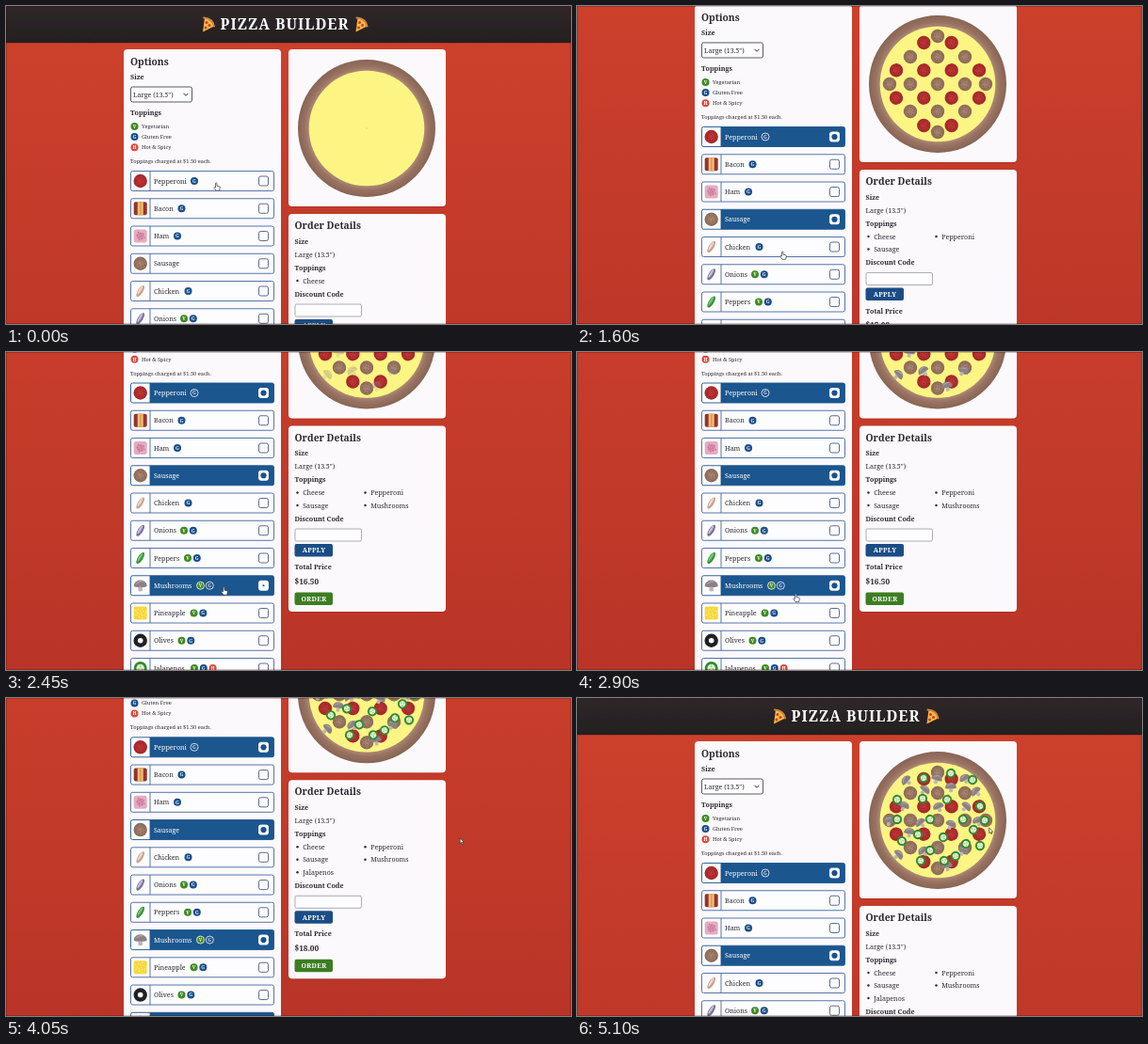
Animation of 600x338 px, one loop 5.15 s. Source, as an HTML page:

```html
<!DOCTYPE html>
<html lang="en">
<head>
<meta charset="utf-8">
<title>Pizza Builder</title>
<style>
  html, body { margin: 0; width: 100%; height: 100%; overflow: hidden; background: #c63b29; }
  svg { display: block; width: 100vw; height: 100vh; }
  text { font: 7.1px 'Noto Serif', serif; fill: #2c2930; }
  .bold { font-weight: 700; font-size: 7.2px; }
  .title { font-weight: 700; font-size: 10.3px; }
  .small { font-size: 5.7px; }
  .price { font-weight: 700; font-size: 8.3px; }
  .button { font-weight: 700; font-size: 7px; letter-spacing: .3px; fill: #fff; text-anchor: middle; }
  .logo { font-weight: 700; font-size: 15.5px; letter-spacing: 1px; fill: #fff; text-anchor: middle; }
  .letter { font-weight: 700; font-size: 5px; fill: #fff; text-anchor: middle; }
  .panel { fill: #fbf9fc; }
  .fill { fill: none; }
  .frame { fill: none; stroke: #45679c; stroke-width: .9; }
  .box { fill: #fdfcfe; stroke: #4a5c86; stroke-width: .9; }
  .dot { fill: #1a5189; }
  .on .fill { fill: #1b568e; }
  .on .frame { stroke: #1b568e; }
  .on .label { fill: #fff; }
  .on .box { stroke: #fff; }
  .on .badge { stroke: #fff; stroke-width: .8; }
</style>
</head>
<body>
<svg id="stage" viewBox="0 0 600 338" preserveAspectRatio="none"></svg>
<script>
const LOOP = 5150, STEP = 50;
const PIZZA = { x: 383, y: 130 };
const ROW_PITCH = 29.25, LIST_PITCH = 13.5;

const text = (x, y, str, cls = '', extra = '') => `<text x="${x}" y="${y}" class="${cls}" ${extra}>${str}</text>`;
const rect = (x, y, w, h, r, attrs) => `<rect x="${x}" y="${y}" width="${w}" height="${h}" rx="${r}" ${attrs}/>`;
const circle = (x, y, r, attrs) => `<circle cx="${x}" cy="${y}" r="${r}" ${attrs}/>`;
const at = (x, y, inner, turn = 0, scale = 1) =>
  `<g transform="translate(${x} ${y}) rotate(${turn}) scale(${scale})">${inner}</g>`;

const BADGES = { V: '#3f8a22', G: '#174e8c', H: '#de4a3c' };
const badge = (kind, x, y) =>
  circle(x, y, 4, `class="badge" fill="${BADGES[kind]}"`) + text(x, y + 1.8, kind, 'letter');

// Artwork centred on the origin
const speckles = (color, r, count) => Array.from({ length: count }, (_, i) => {
  const a = i * 2.4, d = r * Math.sqrt((i + .5) / count);
  return circle((d * Math.cos(a)).toFixed(1), (d * Math.sin(a)).toFixed(1), .6, `fill="${color}"`);
}).join('');
const slicedMeat = (fill, fleck) => circle(0, 0, 7.2, `fill="${fill}"`) + speckles(fleck, 6, 12);
const strip = (main, light) =>
  at(0, 0, `<ellipse rx="2.7" ry="7" fill="${main}"/><ellipse cx="-.8" cy="-.6" rx="1.2" ry="5" fill="${light}"/>`, 32);
const mushroom =
  '<path d="M-1.9-1H1.9L2.3 5.500Q0 7-2.300 5.500Z" fill="#bdb4b3"/>' +
  '<path d="M-7 .8C-7-8 7-8 7 .8Q4 2.500 0 1.200Q-4 2.500-7 .8Z" fill="#8b8184"/>' +
  '<path d="M-5-1C-4-5 2-6 4-4C1-4-2-3-5-1Z" fill="#aaa1a4"/>';
const pepperRing = circle(0, 0, 5.6, 'fill="#e6f2d2" stroke="#2f8a33" stroke-width="2.7"') +
  [0, 120, 240].map(a => at(0, 0, '<ellipse cy="-2.2" rx=".9" ry="1.5" fill="#a5cd80"/>', a)).join('');
const art = {
  Pepperoni: slicedMeat('url(#pepperoni)', '#9c2529'),
  Bacon: rect(-7, -7, 14, 14, 2, 'fill="#94332f"') + rect(-3, -7, 6, 14, 0, 'fill="#efc277"') +
    rect(-.6, -7, 1.6, 14, 0, 'fill="#e09a52"'),
  Ham: rect(-7, -7, 14, 14, 2.5, 'fill="#e6abc0"') + circle(0, 0, 4, 'fill="#d58ca8"') + speckles('#b96a8a', 5, 9),
  Sausage: slicedMeat('url(#sausage)', '#806050'),
  Chicken: strip('#c9a48f', '#ecd8c8'),
  Onions: strip('#7d6f9f', '#c9bedb'),
  Peppers: strip('#36953f', '#7fc072'),
  Mushrooms: mushroom,
  Pineapple: rect(-7, -7, 14, 14, 1.5, 'fill="#f6d83d"') + speckles('#fff2a0', 6, 14),
  Olives: circle(0, 0, 5, 'fill="#fff" stroke="#202125" stroke-width="4.4"'),
  Jalapenos: pepperRing
};

// Options list: name, badge letters, first badge position
const toppings = [
  ['Pepperoni', 'G', 200], ['Bacon', 'G', 186.5], ['Ham', 'G', 182], ['Sausage', '', 0],
  ['Chicken', 'G', 193.5], ['Onions', 'VG', 189], ['Peppers', 'VG', 193], ['Mushrooms', 'VG', 206.5],
  ['Pineapple', 'VG', 199.5], ['Olives', 'VG', 186.5], ['Jalapenos', 'VGH', 200]
];
const chosen = [['Pepperoni', 300], ['Sausage', 1150], ['Mushrooms', 2380], ['Jalapenos', 3550]];

const toppingRow = ([name, badges, badgeX], i) => at(0, 186 + ROW_PITCH * i, `<g id="row-${name}">
  ${rect(132.5, -10.5, 152, 21, 2, 'fill="#fdfcfe"')}
  <path class="fill" d="M153-10.5H283Q284.5-10.5 284.5-9V9Q284.5 10.5 283 10.5H153Z"/>
  ${rect(132.5, -10.5, 152, 21, 2, 'class="frame"')}<path class="frame" d="M153-10.5V10.5"/>
  ${at(142.7, 0, art[name])}${text(157, 2.5, name, 'label')}
  ${[...badges].map((b, k) => badge(b, badgeX + k * 9.8, 0)).join('')}
  ${rect(268.5, -5, 10, 10, 2, 'class="box"')}
  ${chosen.some(c => c[0] === name) ? circle(273.5, 0, 0, `class="dot" id="dot-${name}"`) : ''}
</g>`);

// Placement on the pizza, relative to its centre
const grid = (values, keep = () => true) =>
  values.flatMap(x => values.map(y => [x, y])).filter(([x, y]) => keep(x, y));
const places = {
  Pepperoni: grid([-44, -14.7, 14.7, 44], (x, y) => Math.abs(x) + Math.abs(y) < 80),
  Sausage: [...grid([-29, 0, 29]), [0, -51], [0, 51], [-51, 0], [51, 0]],
  Mushrooms: [[-33, -42], [-1, -44], [29, -44], [-14, -32], [14, -35], [41, -30], [-36, -15], [1, -14],
    [30, -14], [-52, 1], [-18, 3], [14, 5], [43, 1], [-42, 37], [-30, 13], [-15, 33], [27, 33], [10, 49]],
  Jalapenos: [[14, -50], [-15, -45], [37, -43], [-43, -22], [-16, -23], [10, -22], [45, -15], [-43, -1],
    [-8, -1], [27, -1], [50, 0], [38, 10], [-21, 15], [6, 18], [-38, 22], [45, 27], [30, 25],
    [-8, 32], [-18, 43], [7, 43], [19, 38]]
};
const pizzaScale = { Mushrooms: .85, Jalapenos: .74 };
const turns = { Mushrooms: 67, Jalapenos: 40 };
const pizzaLayer = name => `<g id="layer-${name}">${places[name].map(([x, y], i) =>
  at(x, y, art[name], (i * (turns[name] || 0)) % 110 - 50, pizzaScale[name] || 1)).join('')}</g>`;

const slice = `<path d="M-5 8L-3-7Q5-5 7 2Z" fill="#f6ba48"/><path d="M-4-7Q6-6 7 2" fill="none"
  stroke="#cd843a" stroke-width="2" stroke-linecap="round"/>` +
  [[-1, -2], [2, 1], [-2, 3.5]].map(([x, y]) => circle(x, y, 1.5, 'fill="#d23a2a"')).join('');

const panel = (x, y, h, id = '') =>
  rect(x, y, 167, h, 4, `class="panel" filter="url(#shadow)" ${id}`);

const listItem = (name, i) => {
  const x = 309.5 + (i % 2) * 72, y = 292 + Math.floor(i / 2) * LIST_PITCH;
  return `<g id="item-${name}">${circle(x, y, 1.2, 'fill="#29262d"')}${text(x + 5.7, y + 2.5, name)}</g>`;
};
const button = (y, label, color) =>
  rect(306.5, y, 40.5, 13.5, 2, `fill="${color}"`) + text(327, y + 9.3, label, 'button');

const stage = document.getElementById('stage');
stage.innerHTML = `<defs>
  <linearGradient id="wall" x2="0" y2="1"><stop stop-color="#ce422c"/><stop offset=".35" stop-color="#c63c2a"/><stop offset="1" stop-color="#b83427"/></linearGradient>
  <linearGradient id="bar" x2="0" y2="1"><stop stop-color="#302829"/><stop offset="1" stop-color="#231f21"/></linearGradient>
  <radialGradient id="crust"><stop offset=".83" stop-color="#b08b78"/><stop offset=".9" stop-color="#987362"/><stop offset="1" stop-color="#886454"/></radialGradient>
  <radialGradient id="pepperoni"><stop stop-color="#c23a37"/><stop offset="1" stop-color="#a3262a"/></radialGradient>
  <radialGradient id="sausage"><stop stop-color="#ad8974"/><stop offset="1" stop-color="#8b6957"/></radialGradient>
  <filter id="shadow"><feDropShadow dx="0" dy=".6" stdDeviation=".6" flood-color="#400" flood-opacity=".3"/></filter>
</defs>
<g id="page">
  ${rect(0, 0, 600, 500, 0, 'fill="url(#wall)"')}
  ${rect(0, 0, 600, 39, 0, 'fill="url(#bar)" filter="url(#shadow)"')}
  ${at(214, 19.5, slice)}${text(296, 25, 'PIZZA BUILDER', 'logo')}${at(376.5, 19.5, slice)}
  ${panel(125, 46, 450)}
  ${text(132, 62.5, 'Options', 'title')}${text(132, 77.7, 'Size', 'bold')}
  ${rect(132.5, 86, 65, 16, 2, 'fill="#fdfcfe" stroke="#4a4851" stroke-width=".9"')}
  ${text(135, 96.5, 'Large (13.5")')}
  <path d="M188.5 92.8L191 95.3L193.5 92.8" fill="none" stroke="#29262d"/>
  ${text(132, 116.2, 'Toppings', 'bold')}
  ${[['V', 'Vegetarian'], ['G', 'Gluten Free'], ['H', 'Hot &amp; Spicy']].map(([b, s], i) =>
    badge(b, 136.5, 128 + 11.1 * i) + text(144, 130 + 11.1 * i, s, 'small')).join('')}
  ${text(132, 167, 'Toppings charged at $1.50 each.', 'small')}
  ${toppings.map(toppingRow).join('')}
  ${panel(300, 46, 167)}
  ${at(PIZZA.x, PIZZA.y, circle(0, 0, 73, 'fill="url(#crust)"') + circle(0, 0, 61.3, 'fill="#fdf583"') +
    circle(0, 0, .6, 'fill="#b5a55a"') + chosen.map(c => pizzaLayer(c[0])).join(''))}
  ${panel(300, 221, 184, 'id="details"')}
  ${text(306.5, 237, 'Order Details', 'title')}${text(306.5, 252.5, 'Size', 'bold')}
  ${text(306.5, 266.5, 'Large (13.5")')}${text(306.5, 280.7, 'Toppings', 'bold')}
  ${['Cheese', ...chosen.map(c => c[0])].map(listItem).join('')}
  <g id="checkout">
    ${text(306.5, 308.5, 'Discount Code', 'bold')}
    ${rect(307, 317, 70.5, 13, 1.5, 'fill="#fdfcfe" stroke="#9a98a0" stroke-width=".8"')}
    ${button(333, 'APPLY', '#1b4d85')}
    ${text(306.5, 360, 'Total Price', 'bold')}${text(306.5, 375.5, '', 'price', 'id="total"')}
    ${button(384.5, 'ORDER', '#3d7d22')}
  </g>
</g>
<g id="cursor" stroke="#35323a" stroke-width=".7" stroke-linejoin="round" fill="#fff">
  <path id="hand" d="M-1.5-3.6Q-.7-4.8 0-3.6V-.8L2.6-.2Q3.4 0 3.3 1L2.7 4.2H-1L-3.2 1.2Q-3.2 0-1.5 .9Z"/>
  <path id="arrow" d="M-1.8-3V2.7L-.5 1.6L.4 3.6L1.3 3.2L.5 1.3H2.2Z"/>
</g>
${rect(.25, .25, 599.5, 337.5, 0, 'fill="none" stroke="#300" stroke-opacity=".4" stroke-width=".7"')}`;

const el = id => document.getElementById(id);
const show = (node, on) => node.setAttribute('display', on ? 'inline' : 'none');
const clamp = v => Math.max(0, Math.min(1, v));
const smooth = v => v * v * (3 - 2 * v);

const scrollKeys = [[0, 0], [1350, 0], [1600, 47], [2130, 142.5], [2900, 142.5], [3000, 159],
  [3900, 159], [4050, 133.7], [4550, 41.5], [4780, 0], [LOOP, 0]];
const cursorKeys = [[0, 224, 192], [600, 224, 192], [1000, 226, 277], [1200, 226, 277], [1500, 219, 265],
  [1900, 219, 265], [2300, 232, 254], [2800, 232, 254], [3300, 242, 325], [3650, 242, 325],
  [4050, 484, 152], [4250, 484, 152], [4550, 439.5, 141], [LOOP, 439.5, 141]];

function sample(keys, t, ease = v => v) {
  const i = Math.max(1, keys.findIndex(k => k[0] >= t));
  const [a, b] = [keys[i - 1], keys[i]];
  const p = ease(clamp((t - a[0]) / (b[0] - a[0])));
  return a.slice(1).map((v, k) => v + (b[k + 1] - v) * p);
}

function render(t) {
  const [scroll] = sample(scrollKeys, t);
  el('page').setAttribute('transform', `translate(0 ${-scroll})`);

  let count = 0;
  for (const [name, clicked] of chosen) {
    const on = t >= clicked, grow = clamp((t - clicked) / 200);
    if (on) count++;
    el('row-' + name).classList.toggle('on', on);
    el('dot-' + name).setAttribute('r', 3.1 * grow);
    el('layer-' + name).setAttribute('opacity', grow);
    show(el('item-' + name), on);
  }
  const shift = Math.floor(count / 2) * LIST_PITCH;
  el('details').setAttribute('height', 184 + shift);
  el('checkout').setAttribute('transform', `translate(0 ${shift})`);
  el('total').textContent = '$' + (12 + 1.5 * count).toFixed(2);

  const [x, y] = sample(cursorKeys, t, smooth);
  el('cursor').setAttribute('transform', `translate(${x} ${y})`);
  show(el('hand'), x <= 285);
  show(el('arrow'), x > 285);
}

const start = performance.now();
function tick() {
  const t = (performance.now() - start) % LOOP;
  render(Math.floor(t / STEP) * STEP);
  requestAnimationFrame(tick);
}
tick();
</script>
</body>
</html>
```
